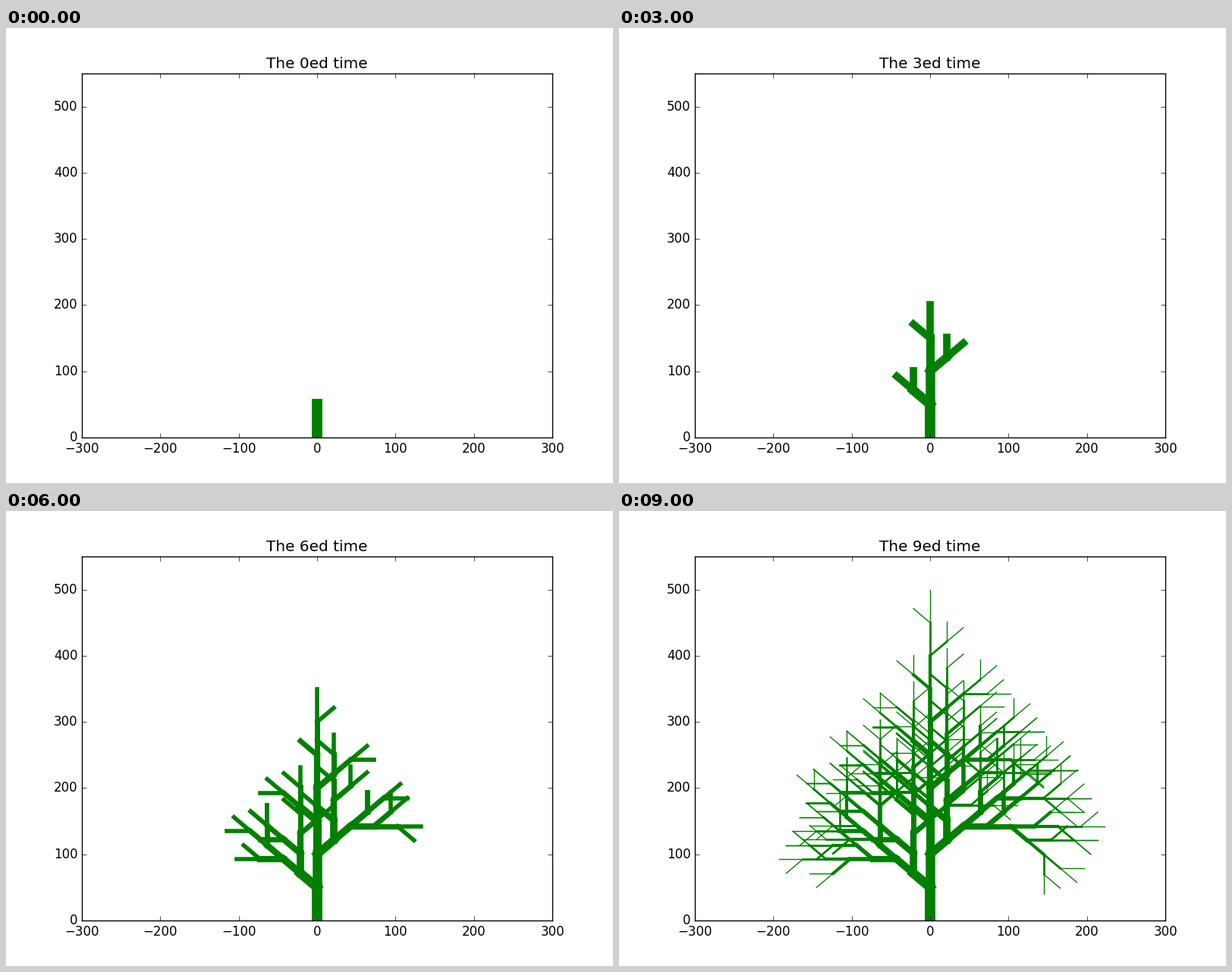
Write a matplotlib script that moves like this. It is 800 by 600 pixels and loops after 10000 ms.

```python
import math

import matplotlib.pyplot as plt
from matplotlib.animation import FuncAnimation

STEPS = 10
TRUNK, TWIG = 50, 30

# Bud kind -> (side of new twig, kind of new twig's bud, next kind of own bud)
RULES = {
    "left": (45, "rest", "right"),
    "right": (-45, "fresh", "left"),
    "fresh": (45, "left", "right"),
}


def sprout(segments, step, x, y, angle, length, kind):
    """Add one segment and return the bud at its end."""
    x2 = x + length * math.cos(math.radians(angle))
    y2 = y + length * math.sin(math.radians(angle))
    segments.append((step, (x, x2), (y, y2)))
    return x2, y2, angle, length, kind


def grow():
    segments = []
    buds = [sprout(segments, 0, 0, 0, 90, TRUNK, "left")]
    for step in range(1, STEPS):
        new = []
        for x, y, angle, length, kind in buds:
            if kind == "rest":
                new.append((x, y, angle, length, "right"))
                continue
            turn, twig, after = RULES[kind]
            new.append(sprout(segments, step, x, y, angle, length, after))
            new.append(sprout(segments, step, x, y, angle + turn, TWIG, twig))
        buds = new
    return segments


plt.style.use("classic")
plt.rcParams["font.family"] = "DejaVu Sans"
fig = plt.figure(figsize=(8, 6), dpi=100, facecolor="white")
ax = fig.add_axes([0.125, 0.1, 0.775, 0.8])
ax.set_xlim(-300, 300)
ax.set_ylim(0, 550)
ax.set_xticks(range(-300, 301, 100))
ax.set_yticks(range(0, 501, 100))
title = ax.set_title("")

branches = []
for born, xs, ys in grow():
    line, = ax.plot(xs, ys, color="green", lw=STEPS - born,
                    solid_capstyle="projecting", scalex=False, scaley=False)
    branches.append((born, line))


def draw(step):
    title.set_text(f"The {step}ed time")
    for born, line in branches:
        line.set_visible(born <= step)
    return [title]


anim = FuncAnimation(fig, draw, frames=STEPS, interval=1000, repeat=True)
plt.show()
```
